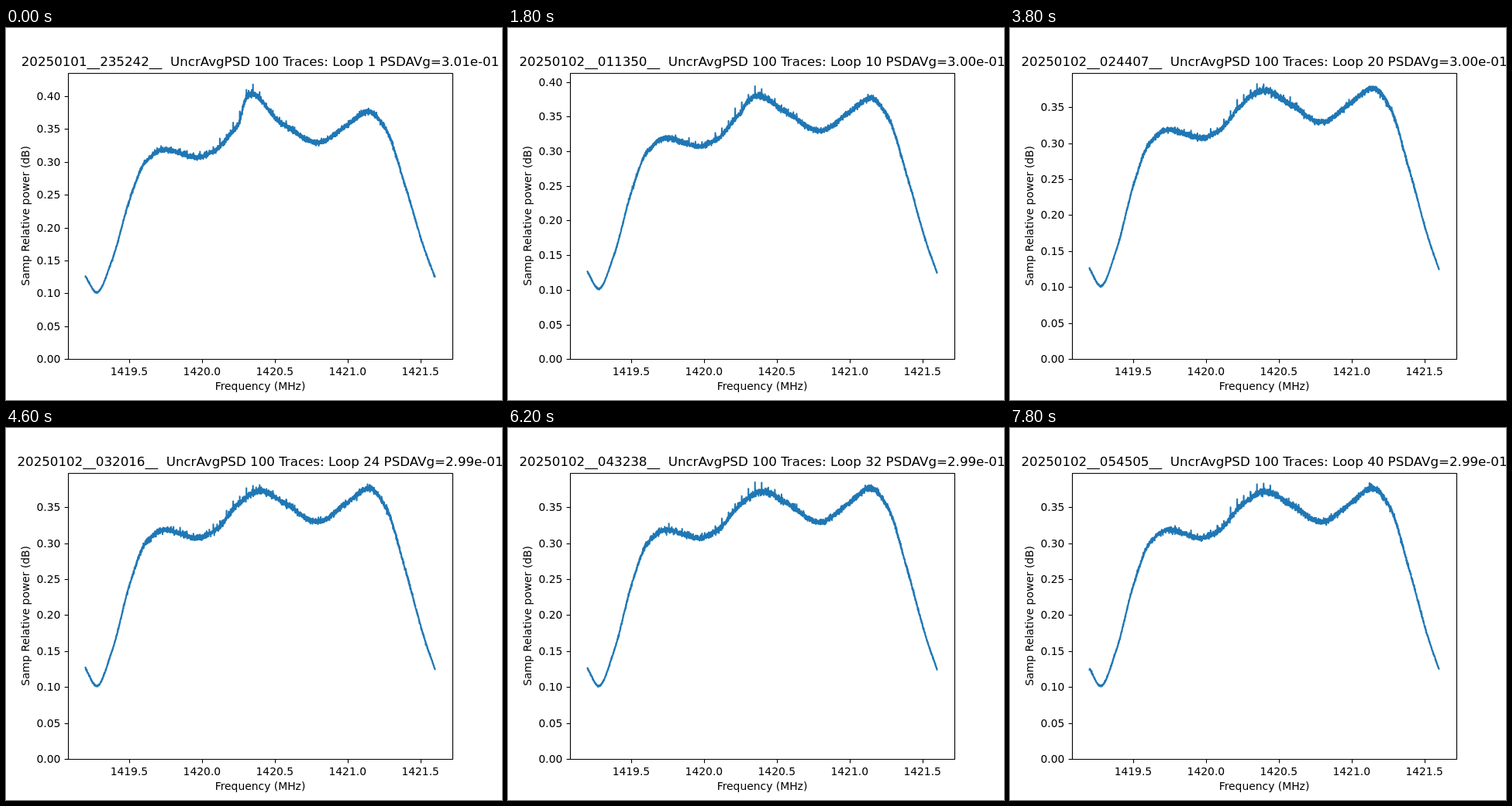
Recreate the animation shown at these times as an HTML page with a canvas. Size 640x480 px, loop 8 s.

```html
<!DOCTYPE html>
<html lang="en">
<head>
<meta charset="utf-8">
<title>Averaged spectrum</title>
<style>
html, body { margin: 0; width: 100%; height: 100%; overflow: hidden; background: #fff; }
canvas { display: block; }
</style>
</head>
<body>
<canvas id="plot" width="640" height="480"></canvas>
<script>
const ctx = document.getElementById('plot').getContext('2d');
const STEP_MS = 200, STEPS = 40, CHANNELS = 4096;
const LEFT = 80, RIGHT = 576, TOP = 57.6, BOTTOM = 427.2;
const X0 = 102.55, X1 = 553.45;
const START = Date.UTC(2025, 0, 1, 23, 52, 42);

// Key points of the receiver passband: [pixel x, power]
const PASSBAND = [
  [102.5, .126], [117, .1015], [137, .151], [160, .244], [180, .300], [204, .3185],
  [247, .307], [270, .3175], [300, .354], [330, .371], [360, .355], [402, .3295],
  [440, .356], [468, .3765], [490, .350], [515, .264], [540, .167], [553.5, .125]
];

function random(seed) {
  return () => {
    seed = seed + 0x6D2B79F5 | 0;
    let n = Math.imul(seed ^ seed >>> 15, 1 | seed);
    n = n + Math.imul(n ^ n >>> 7, 61 | n) ^ n;
    return ((n ^ n >>> 14) >>> 0) / 4294967296;
  };
}

// Monotone cubic curve: flat at the extrema, harmonic mean slopes elsewhere
function curve(points, x) {
  const last = points.length - 1;
  const rise = k => (points[k + 1][1] - points[k][1]) / (points[k + 1][0] - points[k][0]);
  const slope = k => {
    const a = rise(Math.max(0, k - 1)), b = rise(Math.min(last - 1, k));
    return a * b > 0 ? 2 * a * b / (a + b) : 0;
  };
  let i = 0;
  while (i < last - 1 && x > points[i + 1][0]) i++;
  const [xa, va] = points[i], [xb, vb] = points[i + 1];
  const w = xb - xa, u = (x - xa) / w, r = 1 - u;
  return va * (1 + 2 * u) * r * r + vb * u * u * (3 - 2 * u)
    + w * u * r * (slope(i) * r - slope(i + 1) * u);
}

const bell = (x, centre, width) => Math.exp(-(((x - centre) / width) ** 2));

// Emission line: steep rise, slower fall
const emission = x => bell(Math.max(x, 314), 314, 22) / (1 + Math.exp((304.5 - x) / 2));

const toChannel = x => Math.round((x - X0) / (X1 - X0) * (CHANNELS - 1));

// Interference: a regular comb of tall peaks above a forest of small ones
const fixed = random(1420);
const channels = Array.from({ length: CHANNELS }, (_, i) => {
  const x = X0 + (X1 - X0) * i / (CHANNELS - 1);
  const busy = x > 190 && x < 375 && fixed() < .08;
  return {
    x,
    base: curve(PASSBAND, x),
    line: emission(x),
    spike: busy ? -.003 * Math.log(1 - .95 * fixed()) : 0
  };
});
for (let x = 207.6; x < 372; x += 8.55) {
  channels[toChannel(x)].spike = .006 + .009 * bell(x, 305, 40);
}

const elapsedSeconds = step => Math.round(step * (540.538 + .0405 * step));
const axisTop = step => Math.max(.398, .4358 - .00248 * step);
const average = step =>
  2.994 + .003 * Math.cos(2 * Math.PI * step / 9) + .013 * Math.exp(-step);

function text(string, x, y, size, align = 'center') {
  ctx.font = `${size}px "DejaVu Sans", sans-serif`;
  ctx.textAlign = align;
  ctx.fillText(string, x, y);
}

const snap = v => Math.round(v) + .5;

function segment(x, y, dx, dy) {
  ctx.beginPath();
  ctx.moveTo(x, y);
  ctx.lineTo(x + dx, y + dy);
  ctx.stroke();
}

function drawTrace(step, toY) {
  const rand = random(step * 7919 + 11);
  const gauss = () => Math.sqrt(-2 * Math.log(1 - rand())) * Math.cos(2 * Math.PI * rand());
  const lineHeight = .037 * Math.exp(-step / 8);
  ctx.strokeStyle = '#1f77b4';
  ctx.lineWidth = 2.08;
  ctx.lineJoin = 'round';
  ctx.lineCap = 'square';
  ctx.beginPath();
  for (const { x, base, line, spike } of channels) {
    const level = base + lineHeight * line;
    ctx.lineTo(x, toY(level * (1 + .0054 * gauss()) + spike * (.6 + .4 * rand())));
  }
  ctx.stroke();
}

function drawAxes(yMax, toY) {
  ctx.strokeStyle = ctx.fillStyle = '#000';
  ctx.lineWidth = 1.11;
  ctx.lineCap = 'butt';
  for (let i = 0; i < 5; i++) {
    const x = X0 + (.3 + .5 * i) * (X1 - X0) / 2.4;
    segment(snap(x), 427.5, 0, 4.9);
    text((1419.5 + .5 * i).toFixed(1), x, 448, 13.89);
  }
  for (let i = 0; i * .05 <= yMax; i++) {
    const y = toY(i * .05);
    segment(80.5, snap(y), -4.9, 0);
    text((i * .05).toFixed(2), 70.3, Math.round(y) + 5, 13.89, 'right');
  }
  ctx.strokeRect(snap(LEFT), snap(TOP), RIGHT - LEFT, snap(BOTTOM) - snap(TOP));
  text('Frequency (MHz)', 328, 467, 13.89);
  ctx.save();
  ctx.translate(30, 242.4);
  ctx.rotate(-Math.PI / 2);
  text('Samp Relative power (dB)', 0, 0, 13.89);
  ctx.restore();
}

function drawTitle(step) {
  const iso = new Date(START + elapsedSeconds(step) * 1000).toISOString();
  const date = iso.slice(0, 10).replace(/-/g, '');
  const time = iso.slice(11, 19).replace(/:/g, '');
  text(`${date}__${time}__\u00a0 UncrAvgPSD 100 Traces: Loop ${step + 1} `
    + `PSDAVg=${average(step).toFixed(2)}e-01`, 328, 49, 16.67);
}

function draw(step) {
  const yMax = axisTop(step);
  const toY = v => BOTTOM - v / yMax * (BOTTOM - TOP);
  ctx.fillStyle = '#fff';
  ctx.fillRect(0, 0, 640, 480);
  drawTrace(step, toY);
  drawAxes(yMax, toY);
  drawTitle(step);
}

let shown = -1;
function tick() {
  const step = Math.floor(performance.now() / STEP_MS) % STEPS;
  if (step !== shown) draw(shown = step);
  requestAnimationFrame(tick);
}
tick();
</script>
</body>
</html>
```
